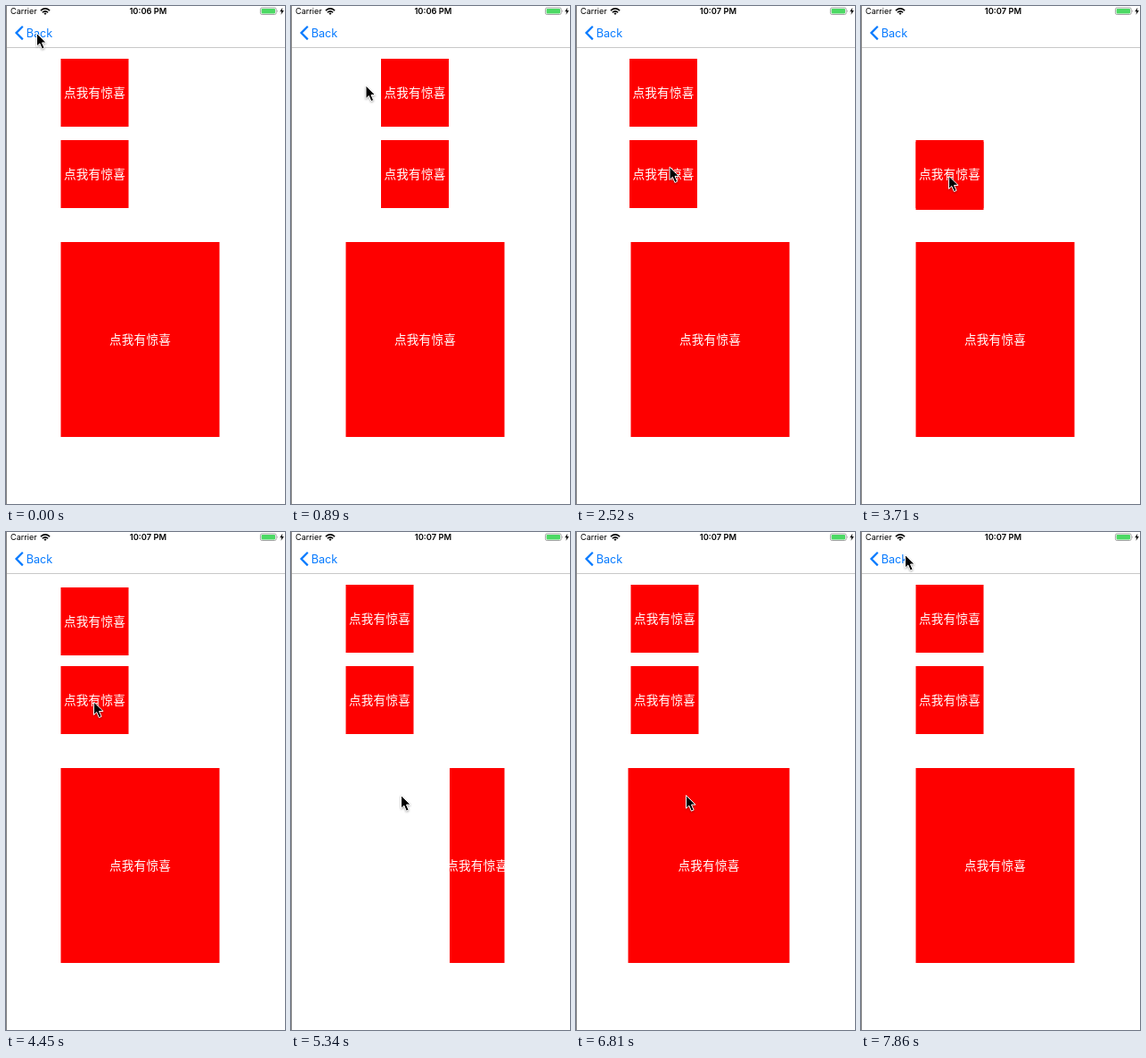
An HTML page for the animation above (8 s loop, 313 px wide and 557 px high).

```html
<!DOCTYPE html>
<html lang="zh">
<head>
<meta charset="utf-8">
<title>Spring boxes</title>
<style>
  html, body { margin: 0; width: 100%; height: 100%; overflow: hidden; background: #fff; }
  svg { display: block; width: 100vw; height: 100vh; }
  text { font-family: Inter, "Liberation Sans", sans-serif; }
  .label {
    font: 300 13.6px "Noto Sans CJK SC", "Noto Sans CJK", sans-serif;
    letter-spacing: .25px; fill: #fff; text-anchor: middle;
  }
  .box { fill: #fe0000; }
  #cursor { filter: drop-shadow(0 1px 1px #0005); }
</style>
</head>
<body>
<svg viewBox="0 0 313 557" preserveAspectRatio="none">
  <rect width="313" height="557" fill="#fff"/>
  <rect y="46" width="313" height="1" fill="#c8c8c8"/>
  <rect width="1" height="557" fill="#858585"/>

  <text x="5" y="9.2" font-size="9.1">Carrier</text>
  <g fill="none" stroke="#000" stroke-width="1.5">
    <path d="M38.9 5.1Q44 .6 49.1 5.1M40.8 7.2Q44 4.5 47.2 7.2"/>
    <path d="M42.4 8.1Q44 6.9 45.6 8.1L44 9.9Z" fill="#000" stroke="none"/>
  </g>
  <text id="clock" x="159.4" y="9.2" font-size="9.3" font-weight="600" text-anchor="middle"></text>
  <rect x="285.4" y="1.9" width="17.8" height="7.6" rx="1.8" fill="#fff" stroke="#8d8d8d" stroke-width=".8"/>
  <rect x="286.6" y="3" width="15.4" height="5.4" rx=".8" fill="#4cd964"/>
  <path d="M304.2 4.4Q305.6 5.7 304.2 7Z" fill="#8d8d8d"/>
  <path d="M310.3 1.8L307.2 6.3H309.2L308.5 9.8L311.8 5.1H309.7Z"/>

  <path d="M18.8 22.8L11.5 30.1L18.8 37.4" fill="none" stroke="#067aff" stroke-width="2.2"/>
  <text x="22.8" y="34.5" font-size="12.7" letter-spacing="-.1" fill="#067aff">Back</text>

  <g id="boxes"></g>

  <path id="cursor" d="M0 0V14.6L3.3 11.5L5.9 17.6L8.6 16.4L6 10.5H10.6Z"
        fill="#000" stroke="#fff" stroke-width="1" stroke-linejoin="round"/>
</svg>
<script>
const LOOP = 8000, FRAMES = 54, STEP = LOOP / FRAMES;
const NS = "http://www.w3.org/2000/svg";
const LEFT = 61.5, SIDE = 76, TRAVEL = 91;
const MOVE = 500;

const byId = id => document.getElementById(id);

function setAttrs(el, attrs) {
  for (const name in attrs) el.setAttribute(name, attrs[name]);
}

function makeBox() {
  const rect = document.createElementNS(NS, "rect");
  const label = document.createElementNS(NS, "text");
  rect.setAttribute("class", "box");
  label.setAttribute("class", "label");
  label.textContent = "点我有惊喜";
  byId("boxes").append(rect, label);
  return (x, y, width, height) => {
    setAttrs(rect, { x, y, width, height });
    setAttrs(label, { x: x + width / 2, y: y + height / 2 + 4.8 });
  };
}

const first = makeBox(), second = makeBox(), big = makeBox();

// Underdamped step response, ms since release.
function spring(ms) {
  if (ms <= 0) return 0;
  const decay = 5.6, freq = 15.5, s = ms / 1000;
  const wave = Math.cos(freq * s) + decay / freq * Math.sin(freq * s);
  return 1 - Math.exp(-decay * s) * wave;
}

// Springs out, then back, snapped to half pixels.
const bounce = (t, out, back) =>
  Math.round(2 * TRAVEL * (spring(t - out) - spring(t - back))) / 2;

const ease = u => u * u * (3 - 2 * u);

// Each stop is reached at time t after an eased move.
const stops = [
  { t: 592, x: 84, y: 89 },
  { t: 1480, x: 128.5, y: 124.5 },
  { t: 2400, x: 108.5, y: 174.5 },
  { t: 2820, x: 98.5, y: 190 },
  { t: 5150, x: 123.5, y: 294.5 },
  { t: 7400, x: 100.5, y: 194.5 },
  { t: 7850, x: 49.5, y: 25.5 }
];

function cursorAt(t) {
  let x = 34.5, y = 30.5;
  for (const stop of stops) {
    const k = ease(Math.min(1, Math.max(0, 1 - (stop.t - t) / MOVE)));
    x += (stop.x - x) * k;
    y += (stop.y - y) * k;
  }
  return [x, y];
}

function render(time) {
  // The picture advances in even steps.
  const t = Math.min(FRAMES - 1, Math.floor((time + 13) / STEP)) * STEP;
  const dx = bounce(t, 822, 1832);
  const dy = bounce(t, 3044, 4104);
  const cut = bounce(t, 5160, 6187);
  first(LEFT + dx, 59 + dy, SIDE, SIDE);
  second(LEFT + dx, 150, SIDE, SIDE);
  big(LEFT + cut, 264, 178 - cut, 218);
  byId("clock").textContent = t < 2200 ? "10:06 PM" : "10:07 PM";
  byId("cursor").setAttribute("transform", `translate(${cursorAt(t)})`);
}

const start = performance.now();
function tick() {
  render((performance.now() - start) % LOOP);
  requestAnimationFrame(tick);
}
tick();
</script>
</body>
</html>
```
